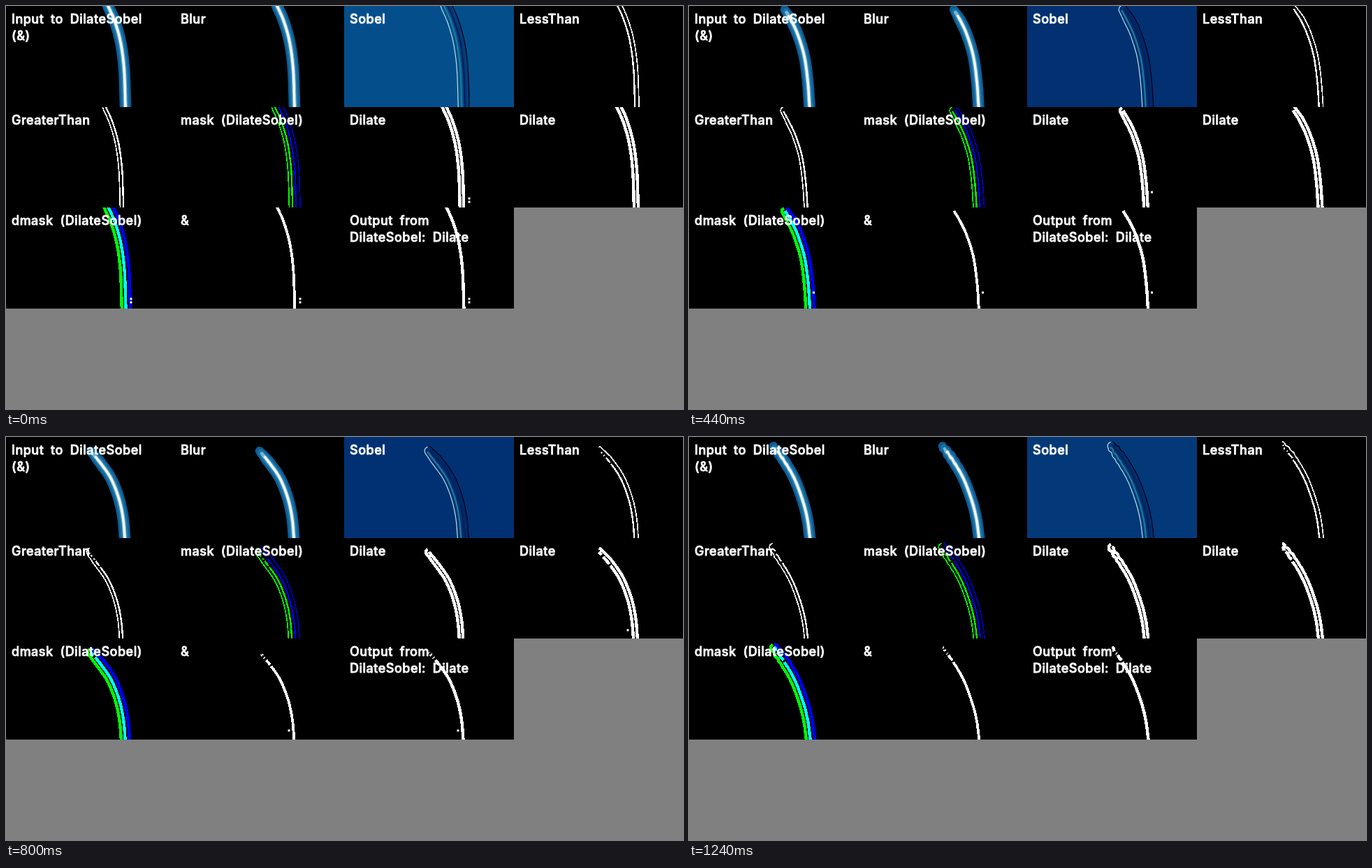
Recreate the animation shown at these times as an HTML page. Size 969x578 px, loop 1.28 s.

```html
<!DOCTYPE html>
<html lang="en">
<head>
<meta charset="utf-8">
<title>DilateSobel pipeline</title>
<style>
html, body { margin: 0; width: 100%; height: 100%; overflow: hidden; background: #808080; }
#stage { display: block; width: 969px; height: 578px; }
path { fill: none; stroke-linejoin: round; }
.mask path { shape-rendering: crispEdges; }
text {
  font: 500 18px Inter, "Open Sans", sans-serif;
  letter-spacing: .5px; word-spacing: 4.5px;
  fill: #fff; stroke: #fff; stroke-width: .8; stroke-linejoin: round;
}
</style>
</head>
<body>
<svg id="stage" viewBox="0 0 969 578"></svg>
<script>
const NS = 'http://www.w3.org/2000/svg';
const LOOP = 1280, STEP = 40;
const COLS = [0, 242, 484, 727, 969], ROWS = [0, 145, 289, 434];
const stage = document.getElementById('stage');

// Centre line, Sobel background, raggedness and breaks of the tip
const KEYS = [
  { t: 0, p: [139,-14, 147,2, 156,23, 164,52, 169,90, 171,144], bg: [4,79,139], wob: 0, loose: 0 },
  { t: 240, p: [140,-14, 148,2, 157.5,25, 166,54, 170.5,92, 172.5,144], bg: [5,73,130], wob: 0, loose: 0 },
  { t: 440, p: [137,5, 147,22, 156,42, 165,72, 170,108, 172.5,144], bg: [2,48,113], wob: 0, loose: 0 },
  { t: 640, p: [115,-3, 134,22, 150,50, 161,80, 168,111, 171.5,144], bg: [3,57,122], wob: 1, loose: 1 },
  { t: 800, p: [121,20, 136.5,39, 150.5,60, 161.5,88, 167.5,116, 170,144], bg: [2,49,115], wob: .1, loose: .9 },
  { t: 1040, p: [120.5,20, 136,37, 150,58, 162,86, 168,115, 171,144], bg: [2,49,115], wob: 0, loose: .8 },
  { t: 1240, p: [121,13, 136,34, 151,60, 163,92, 169.5,118, 173,144], bg: [3,57,120], wob: .7, loose: .7 }
];

// Short-lived specks: time, x, y, cells that show them
const SPECKS = [
  [0, 179, 131, [6, 8, 9, 10]], [0, 179, 136, [6, 8, 9, 10]],
  [440, 178.5, 122, [6, 8, 9, 10]],
  [800, 163, 132, [7, 9, 10]]
];

// Filled bands around the centre line
const ray = [
  { band: 8.3, c: '#0b5c94' }, { band: 5.6, c: '#1b71a2', from: 2 },
  { band: 2.9, c: '#76b5d2', from: 4 }, { band: 1.6, c: '#fff', from: 10 }
];

const rise = c => [{ off: -7.5, w: 1.7, c, hook: 115 }, { off: -2.8, w: 2.4, c, gaps: .7 }];
const fall = (c, edge = c) => [{ off: 2.2, w: 2.4, c, gaps: 1 }, { off: 8.1, w: 1.7, c: edge, hook: -45 }];
const wide = (off, c, more) => ({ off, w: 4.4, c, ...more });

const CELLS = [
  { label: ['Input to DilateSobel', '(&)'], lines: ray },
  { label: ['Blur'], lines: ray },
  { label: ['Sobel'], sobel: true, lines: [
    { off: 4, w: 6, c: 'rgba(0,25,85,.35)' },
    { off: -2.8, w: 2.4, c: '#1f7796' },
    { off: 2, w: 2.6, c: '#03225f' },
    { off: -7.7, w: 1.2, c: '#b4e6ea', hook: 115 },
    { off: 8.2, w: 1.4, c: '#00031c', hook: -45 }] },
  { label: ['LessThan'], mask: true, lines: fall('#fff') },
  { label: ['GreaterThan'], mask: true, lines: rise('#fff') },
  { label: ['mask (DilateSobel)'], mask: true, lines: [...fall('#00f', '#0000c8'), ...rise('#0f0')] },
  { label: ['Dilate'], mask: true, lines: [wide(-5.2, '#fff', { hook: 110 }), wide(.3, '#fff')] },
  { label: ['Dilate'], mask: true, lines: [wide(1, '#fff', { gaps: .6 }), wide(6.9, '#fff', { hook: -45 })] },
  { label: ['dmask (DilateSobel)'], mask: true, lines: [
    wide(7, '#00f', { hook: -45 }), wide(-5.2, '#0f0', { hook: 110 }), wide(.5, '#0ff', { gaps: .5 })] },
  { label: ['&'], mask: true, lines: [{ off: .3, w: 3.8, c: '#fff', gaps: 1 }] },
  { label: ['Output from', 'DilateSobel: Dilate'], mask: true, lines: [wide(.4, '#fff', { gaps: .8 })] }
];

function add(parent, tag, attrs) {
  const el = document.createElementNS(NS, tag);
  for (const k in attrs) el.setAttribute(k, attrs[k]);
  return parent.appendChild(el);
}

const paths = [], specks = [];
let sobelBg;

add(stage, 'rect', { width: 969, height: 578, fill: '#808080' });
CELLS.forEach((cell, i) => {
  const col = i % 4, row = i >> 2, x = COLS[col], y = ROWS[row];
  const width = COLS[col + 1] - x, height = ROWS[row + 1] - y;
  const box = add(stage, 'svg', { x, y, width, height, overflow: 'hidden', class: cell.mask ? 'mask' : '' });
  const bg = add(box, 'rect', { width, height, fill: '#000' });
  if (cell.sobel) sobelBg = bg;
  for (const line of cell.lines) {
    const paint = line.band ? { style: `fill:${line.c}` } : { stroke: line.c, 'stroke-width': line.w };
    paths.push({ el: add(box, 'path', paint), line });
  }
  for (const [t, sx, sy, where] of SPECKS) {
    if (!where.includes(i)) continue;
    const el = add(box, 'rect', { x: sx - 1.5, y: sy - 1.5, width: 3, height: 3, fill: '#fff' });
    specks.push({ el, t });
  }
  cell.label.forEach((s, n) => {
    add(box, 'text', { x: 8, y: 25 + 24.3 * n }).textContent = s;
  });
});

const mix = (a, b, k) => a + (b - a) * k;
const mixAll = (a, b, k) => a.map((v, i) => mix(v, b[i], k));

function poseAt(t) {
  let i = 0;
  while (i < KEYS.length - 2 && t >= KEYS[i + 1].t) i++;
  const a = KEYS[i], b = KEYS[i + 1], k = (t - a.t) / (b.t - a.t);
  return {
    p: mixAll(a.p, b.p, k), bg: mixAll(a.bg, b.bg, k),
    wob: mix(a.wob, b.wob, k), loose: mix(a.loose, b.loose, k)
  };
}

// Catmull-Rom samples with unit tangent and arc length
function trace(p) {
  const pts = [];
  for (let i = 0; i < p.length; i += 2) pts.push([p[i], p[i + 1]]);
  const n = pts.length;
  const beyond = (a, b) => [2 * a[0] - b[0], 2 * a[1] - b[1]];
  const q = [beyond(pts[0], pts[1]), ...pts, beyond(pts[n - 1], pts[n - 2])];
  const out = [];
  let s = 0;
  for (let i = 1; i < n; i++) {
    for (let j = 0; j < 20 || (i === n - 1 && j < 24); j++) {
      const u = j / 20;
      const at = d => {
        const a = q[i - 1][d], b = q[i][d], c = q[i + 1][d], e = q[i + 2][d];
        const k1 = c - a, k2 = 2 * a - 5 * b + 4 * c - e, k3 = 3 * b - a - 3 * c + e;
        return [b + (k1 * u + k2 * u * u + k3 * u ** 3) / 2, (k1 + 2 * k2 * u + 3 * k3 * u * u) / 2];
      };
      const [x, dx] = at(0), [y, dy] = at(1), len = Math.hypot(dx, dy);
      const last = out[out.length - 1];
      if (last) s += Math.hypot(x - last.x, y - last.y);
      out.push({ x, y, tx: dx / len, ty: dy / len, s });
    }
  }
  return out;
}

// The tip is a little slimmer than the rest
const taper = s => Math.min(1, .76 + s / 70);

// Points of an arc around the tip, ending at the side of the given offset
function arc({ x, y, tx, ty, s }, off, degrees) {
  const r = Math.abs(off) * taper(s), sign = Math.sign(off);
  const start = Math.atan2(-tx * sign, ty * sign);
  return Array.from({ length: 8 }, (_, i) => {
    const a = start + degrees * Math.PI / 180 * (8 - i) / 8;
    return [x + r * Math.cos(a), y + r * Math.sin(a)];
  });
}

function beside({ x, y, tx, ty, s }, off, wob) {
  const o = off * taper(s) + wob * 1.7 * Math.sin(s * .6 + off * .4) * Math.exp(-s / 18);
  return [x + ty * o, y - tx * o];
}

const toPath = pts => 'M' + pts.map(p => p[0].toFixed(1) + ' ' + p[1].toFixed(1)).join('L');

function bandPath(curve, { band, from = 0 }, wob) {
  const body = curve.filter(c => c.s >= from);
  const left = body.map(c => beside(c, -band, wob));
  const right = body.map(c => beside(c, band, wob));
  return toPath([...left.reverse(), ...arc(body[0], band, -180), ...right]) + 'Z';
}

function linePath(curve, { off, hook, gaps = 0 }, pose) {
  const loose = pose.loose * gaps;
  const parts = [hook ? arc(curve[0], off, hook) : []];
  for (const c of curve) {
    const grain = .6 * Math.sin(c.s * 1.15 + 2) + .4 * Math.sin(c.s * .47);
    if (loose && c.s < 28 && grain < loose * 1.5 * (1 - c.s / 28) - 1) parts.push([]);
    else parts[parts.length - 1].push(beside(c, off, pose.wob));
  }
  return parts.filter(p => p.length > 1).map(toPath).join('');
}

function draw(t) {
  const pose = poseAt(t), curve = trace(pose.p);
  sobelBg.setAttribute('fill', `rgb(${pose.bg.map(Math.round)})`);
  for (const { el, line } of paths) {
    el.setAttribute('d', line.band ? bandPath(curve, line, pose.wob) : linePath(curve, line, pose));
  }
  for (const { el, t: when } of specks) el.setAttribute('visibility', when === t ? 'visible' : 'hidden');
}

let shown = -1;
function tick() {
  const t = Math.floor(performance.now() % LOOP / STEP) * STEP;
  if (t !== shown) draw(shown = t);
  requestAnimationFrame(tick);
}
tick();
</script>
</body>
</html>
```
